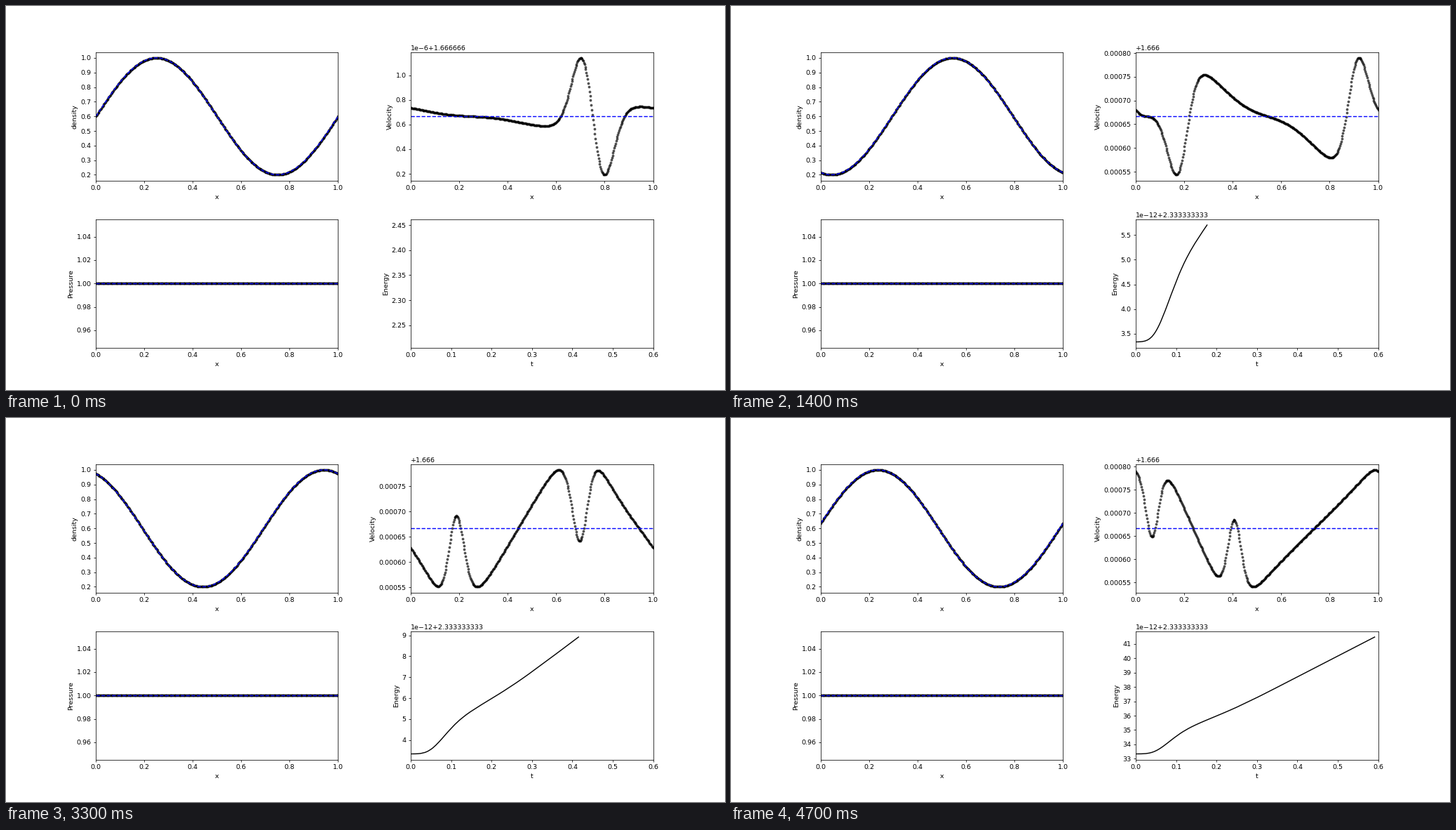
These frames come from a looping animation (1025 px wide and 547 px high, 4800 ms). A matplotlib script:

```python
import numpy as np
import matplotlib.pyplot as plt
from matplotlib.animation import FuncAnimation

FRAMES, INTERVAL = 48, 100
DPI = 205 / 3
POINTS = 400
SPEED = 5 / 3        # drift of the density wave
ENERGY = 7 / 3
STIFFNESS = .3575    # ripple speed is STIFFNESS / sqrt(density)
T0 = 1.3e-4          # time of the first frame
STEP = .01258        # time between frames
SUBSTEPS = 12

x = np.linspace(0, 1, POINTS)


def clock(n):
    return T0 + n * STEP


def density(pos):
    return .6 + .4 * np.sin(2 * np.pi * pos)


def kick(eta):
    """First velocity error, odd around the density minimum."""
    w = eta / .051
    return (.068 * np.sin(2 * np.pi * eta) + .026 * np.sin(4 * np.pi * eta)
            - .511 * w * np.exp((1 - w * w) / 2))


def ripples():
    """Let the kick spread as waves between density minimum and maximum."""
    eta = np.linspace(0, .5, 301)
    c2 = STIFFNESS ** 2 / density(eta + .75)
    dt, d_eta = STEP / SUBSTEPS, eta[1]
    u = kick(eta)
    rate = u / T0
    shots = [u.copy()]
    for _ in range(FRAMES - 1):
        for _ in range(SUBSTEPS):
            rate[1:-1] += dt * c2[1:-1] * np.diff(u, 2) / d_eta ** 2
            u[1:-1] += dt * rate[1:-1]
        shots.append(u.copy())
    return eta, shots


def bell(t, mid, width):
    return np.exp(-((t - mid) / width) ** 2 / 2)


def energy_history():
    """Slow drift: a soft start, a short surge, a lull, then a steady climb."""
    t = np.linspace(0, clock(FRAMES - 1), 40 * (FRAMES - 1) + 1)
    slope = (14.5 * (1 - np.exp(-(t / .049) ** 3))
             + 8.3 * bell(t, .083, .03) - 2.8 * bell(t, .19, .06))
    steps = (slope[1:] + slope[:-1]) / 2 * np.diff(t)
    return t, ENERGY + 1e-12 * np.concatenate([[0], np.cumsum(steps)])


ETA, RIPPLES = ripples()
TIMES, ENERGIES = energy_history()


def velocity(n):
    eta = (x - SPEED * clock(n) - .25) % 1 - .5
    return SPEED + 1e-6 * np.sign(eta) * np.interp(np.abs(eta), ETA, RIPPLES[n])


fig, axes = plt.subplots(2, 2, figsize=(1025.01 / DPI, 547.01 / DPI), dpi=DPI)
fig.subplots_adjust(left=.125, right=.9, bottom=.11, top=.88, wspace=.301, hspace=.3)
(ax_rho, ax_u), (ax_p, ax_e) = axes


def panel(ax, ylabel):
    ax.set(xlim=(0, 1), xlabel="x", ylabel=ylabel)
    dots, = ax.plot([], [], "ko", ms=3, alpha=.6)
    exact, = ax.plot([], [], "b--")
    return dots, exact


rho_lines = panel(ax_rho, "density")
u_lines = panel(ax_u, "Velocity")
p_lines = panel(ax_p, "Pressure")
ax_e.set(xlim=(0, .6), xlabel="t", ylabel="Energy")
e_line, = ax_e.plot([], [], "k-")


def update(n):
    rho = density(x - SPEED * clock(n))
    one = np.ones(POINTS)
    for lines, values, exact in ((rho_lines, rho, rho),
                                 (u_lines, velocity(n), SPEED * one),
                                 (p_lines, one, one)):
        lines[0].set_data(x, values)
        lines[1].set_data(x, exact)
    shown = 40 * n + 1
    e_line.set_data(TIMES[:shown], ENERGIES[:shown])
    for ax in axes.flat:
        ax.relim()
        ax.autoscale_view(scalex=False)
    return [*rho_lines, *u_lines, *p_lines, e_line]


anim = FuncAnimation(fig, update, frames=FRAMES, interval=INTERVAL,
                     init_func=lambda: update(0), repeat=True, repeat_delay=0)
plt.show()
```
